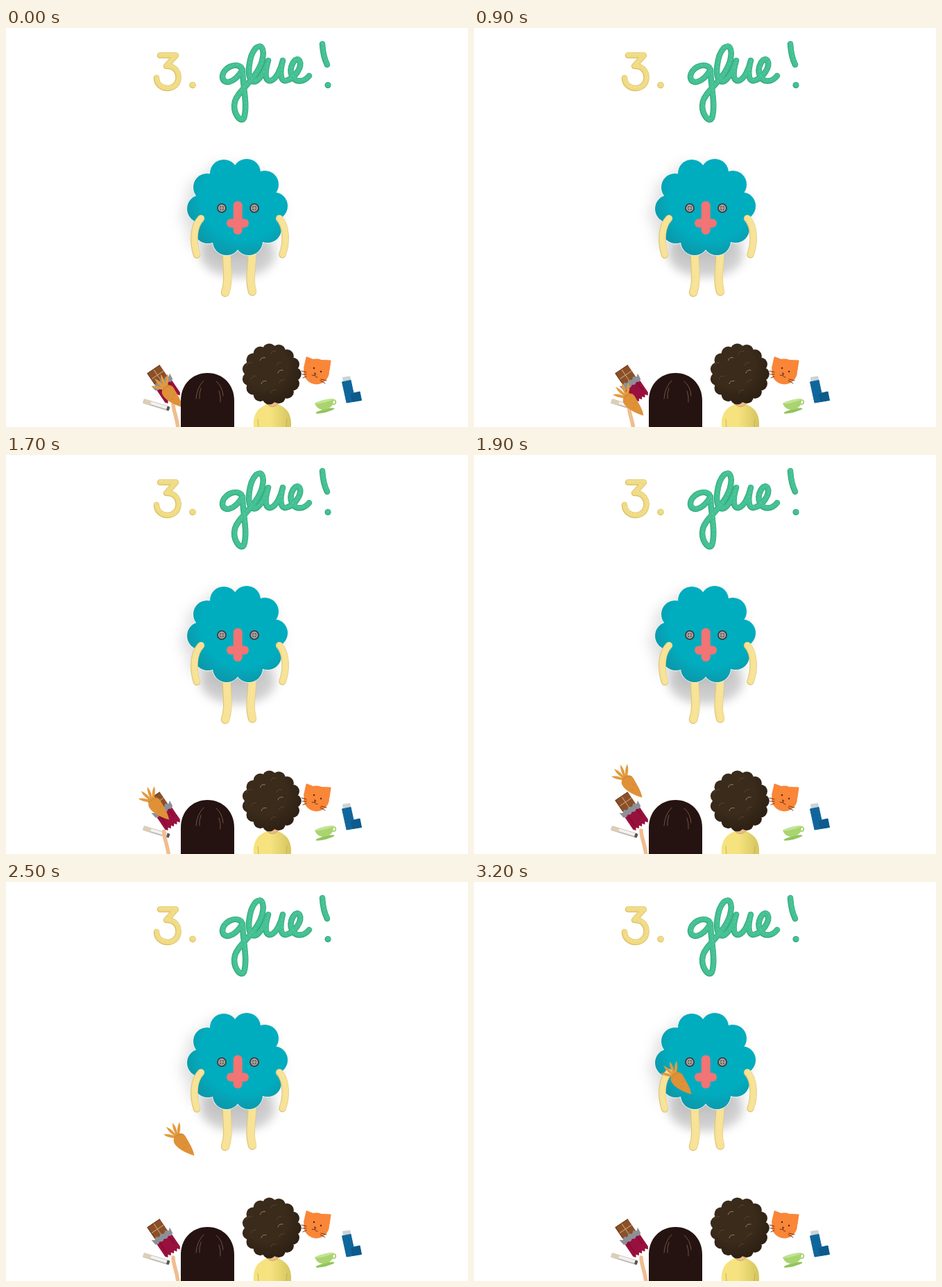
Recreate the animation shown at these times as an HTML page. Size 666 px wide and 576 px high, loop 3300 ms.

```html
<!DOCTYPE html>
<html lang="en">
<head>
<meta charset="utf-8">
<title>3. glue!</title>
<style>
  html, body { margin: 0; width: 100%; height: 100%; overflow: hidden; background: #fff; }
  svg { display: block; width: 100%; height: 100%; }
  .line { fill: none; stroke-linecap: round; stroke-linejoin: round; }
</style>
</head>
<body>
<svg viewBox="0 0 666 576" role="img" aria-label="3. glue!">
  <defs>
    <filter id="soft" x="-40%" y="-40%" width="180%" height="180%"><feGaussianBlur stdDeviation="10"/></filter>
    <filter id="near" x="-40%" y="-60%" width="180%" height="220%"><feGaussianBlur stdDeviation="7"/></filter>
    <radialGradient id="teal" gradientUnits="userSpaceOnUse" cx="342" cy="245" r="86">
      <stop offset=".7" stop-color="#00adbf"/><stop offset="1" stop-color="#0c98aa"/>
    </radialGradient>
    <radialGradient id="brown" gradientUnits="userSpaceOnUse" cx="374" cy="488" r="62">
      <stop offset=".5" stop-color="#3a2b1b"/><stop offset="1" stop-color="#2a1d11"/>
    </radialGradient>
    <linearGradient id="shirt"><stop offset=".45" stop-color="#f6e37f"/><stop offset="1" stop-color="#d5c45e"/></linearGradient>
  </defs>

  <g id="title"></g>

  <g id="shadow" fill="#8d8d8d" opacity=".3" filter="url(#soft)" transform="translate(-8 8)"></g>
  <ellipse cx="334" cy="328" rx="54" ry="32" fill="#9c9c9c" opacity=".48" filter="url(#near)"/>
  <g id="legs"></g>
  <g id="rim" fill="#fff" stroke="#f1f5f3" stroke-width="1.800"></g>
  <g id="body" fill="url(#teal)"></g>
  <g id="eyes"></g>
  <g fill="#f27474">
    <rect x="318" y="275.500" width="32" height="12.500" rx="6.200"/>
    <rect x="327.700" y="280" width="13" height="18" rx="6.300"/>
    <rect x="327.700" y="250" width="13" height="33" rx="6.300"/>
  </g>
  <g id="arms"></g>

  <g transform="translate(216.500 544) rotate(17)">
    <rect x="-19" y="-3" width="38" height="6" rx="1" fill="#f4f2ee" stroke="#bbb" stroke-width=".7"/>
    <rect x="-19" y="1.500" width="38" height="1.600" fill="#bdb8b1"/>
    <rect x="-19" y="-3" width="11" height="6" rx="1" fill="#dccfb5"/>
    <rect x="16" y="-3" width="4" height="6" rx="1" fill="#555"/>
  </g>

  <g id="chocolate" transform="translate(225 511) rotate(-34)">
    <rect x="-11" y="-22.500" width="22" height="26" fill="#8a5029"/>
    <path class="line" d="M0 -21V-3M-10 -12H10" stroke="#c9976a" stroke-width="1.200"/>
    <path class="line" d="M-10.500 -4V-22H10.500" stroke="#6d3a1b" stroke-width="1"/>
  </g>

  <path id="arm" class="line" d="M241 542C241 556 249 562 250 600" stroke="#f0bd90" stroke-width="5.500"/>

  <g id="carrot">
    <g id="leaves" fill="#e39a40"></g>
    <path d="M15 24C16 16 27 13 32 21C37 30 43 39 44.500 48.500C36 46 24 41 18 34C15 30 14 28 15 24Z" fill="#df9138"/>
    <path class="line" d="M16 23Q22 16 29 18M29 38L31 36M33 29L31 31" stroke="#c37d2f" stroke-width=".8"/>
  </g>

  <path d="M252 576V538C252 514 269 498 290.500 498C312 498 329 514 329 538V576Z" fill="#251311"/>
  <path class="line" d="M285 509Q275 519 274 535M281 520Q278 528 279 535M303 510Q312 517 313 531M307 524Q310 532 309 540" stroke="#705246" stroke-width="1"/>

  <path d="M375 538H393V549Q384 556 375 549Z" fill="#edb98d"/>
  <path d="M357 576C356 558 362 549 376 543Q384 551 392 543C406 549 412 558 411 576Z" fill="url(#shirt)"/>
  <path class="line" d="M376 543Q384 551 392 543M364 576L363 565M404 576L405 565" stroke="#bda94f" stroke-width=".8"/>
  <g id="curls"></g>

  <g>
    <path d="M430 491L433.500 475.500L445 480ZM456 480L467.500 480.500L465.500 494Z" fill="#fa8638" stroke="#fa8638" stroke-width="2" stroke-linejoin="round"/>
    <circle cx="447.500" cy="496" r="18.500" fill="#fa8638"/>
    <circle cx="444" cy="491" r="1.200" fill="#4a2416"/><circle cx="454" cy="496" r="1.200" fill="#4a2416"/>
    <path class="line" d="M445 498L447 499L445.500 500.500ZM445.500 501Q443 503 441 501M445.500 501Q446 505 449 504M426 495L433 497M427 500L433 500M428 505L433 503M454 507L462 509M453 509L460 513" stroke="#5a2c18" stroke-width=".9"/>
  </g>

  <g transform="translate(460.500 543) rotate(-14) scale(.92)">
    <ellipse cx="-3" cy="10" rx="15" ry="2.600" fill="#93c45c"/>
    <circle cx="13" cy="0" r="3.500" fill="none" stroke="#a6d06d" stroke-width="2"/>
    <path d="M-16 -5H14C13 4 7 8 -1 8C-10 8 -15 3 -16 -5Z" fill="#a9d470"/>
    <ellipse cx="-1" cy="-5" rx="15" ry="2.200" fill="#c3e394"/>
  </g>

  <path d="M485 504L496 502.500L498 511L486 513Z" fill="#cbd3d6"/>
  <path d="M484.500 511L497 508.500L501 527L510 525L512.500 537.500L491 541Z" fill="#10669b" stroke="#10669b" stroke-linejoin="round"/>
  <path d="M497 529L501 527L510 525L512.500 537.500L499 539.500Z" fill="#0d5a8b"/>
</svg>
<script>
const $ = id => document.getElementById(id);
const add = (id, markup) => $(id).insertAdjacentHTML('beforeend', markup);
const line = (d, color, width, extra = '') =>
  `<path class="line" d="${d}" stroke="${color}" stroke-width="${width}" ${extra}/>`;
const disc = (x, y, r, attrs = '') => `<circle cx="${x}" cy="${y}" r="${r}" ${attrs}/>`;

// A rolled strip of clay: dark edge, main colour, fine lighter grain.
const clay = (d, width, edge, fill, light) =>
  line(d, edge, width) +
  line(d, fill, width - 1.6, 'transform="translate(.3 -.4)"') +
  line(d, light, 1, 'stroke-dasharray="2 4" transform="translate(1 -1.5)" opacity=".6"');

const yellow = ['#d9bd60', '#f0db85', '#f9ebad'];
const green = ['#2da67a', '#44c092', '#70d5ae'];
const limb = ['#dcc477', '#f7e296', '#fbedb9'];

add('title',
  clay('M222 39.500H245L231 55C254 54 254 87 233 87C224 87 217 81 217 72', 8.5, ...yellow) +
  clay('M269 82.500h.1', 9.5, ...yellow) +
  clay('M339 57C330 49 312 58 312 71C313 82 329 81 341 60C341 84 349 111 343 130C338 138 326 122 330 106C335 89 360 76 369 48C374 28 367 23 360 29C350 40 347 69 354 76C362 82 372 66 378 47C372 67 374 78 382 76C390 73 396 60 399 47C394 66 396 78 404 76C416 73 428 56 423 47C417 40 407 57 412 69C417 80 430 78 437 69', 8.5, ...green) +
  clay('M456 23Q457 41 463 53', 8.5, ...green) +
  clay('M464 82.500h.1', 9, ...green));

const lobes = [[314, 210], [347, 209], [373, 226], [386, 257], [377, 290],
               [350, 308], [318, 308], [291, 291], [281, 261], [290, 230]];
const blob = lobes.map(([x, y]) => disc(x, y, 20)).join('') + disc(334, 260, 56);
['shadow', 'rim', 'body'].forEach(id => add(id, blob));

add('legs',
  clay('M318 322C318 350 322 364 316 382', 12.5, ...limb) +
  clay('M355 322C354 350 350 364 355 380.500', 12.5, ...limb));
add('arms',
  clay('M281 275C270 286 269 309 275 327.500', 10.5, ...limb) +
  clay('M394 275C404 286 405 309 398.500 327', 10.5, ...limb));
add('eyes', [311, 358].map(x =>
  disc(x, 260, 7, 'fill="#3c4046"') +
  disc(x, 260, 4.3, 'fill="#6a6463" stroke="#d0c6c1" stroke-width="1.2"') +
  line(`M${x - 3} 260h6M${x} 257v6`, '#d0c6c1', 0.9)).join(''));

// Foil and wrapper with toothed edges.
const teeth = (x, y, n, dx, dy) =>
  Array.from({ length: n }, (_, i) => `L${x + dx * (i + 1)} ${y + (i % 2 ? 0 : dy)}`).join('');
add('chocolate',
  `<path d="M-13 0H13V27${teeth(13, 27, 10, -2.6, 3.5)}Z" fill="#98103d"/>` +
  line('M-8 8V23M8 7V19', '#7b0b30', 1) +
  `<path d="M-16 -4${teeth(-16, -4, 8, 4, 3)}L15 5${teeth(15, 5, 8, -3.75, 2)}Z" fill="#8d9097"/>`);

// Carrot leaves: pointed blades fanning out from one base.
const leaf = ([x, y]) => {
  const dx = x - 21, dy = y - 23, k = 4.2 / Math.hypot(dx, dy);
  const mx = 21 + dx * .6, my = 23 + dy * .6;
  return `<path d="M21 23Q${mx - dy * k} ${my + dx * k} ${x} ${y}Q${mx + dy * k} ${my - dx * k} 21 23Z"/>`;
};
add('leaves', [[0, 18], [4, 7], [13, 1], [23, 0]].map(leaf).join('') + disc(20, 20, 5));

// Curly hair: a ring of lumps and a few curved glints.
const ring = (n, fn) => Array.from({ length: n }, (_, i) => fn(i * 2 * Math.PI / n, i)).join('');
add('curls',
  disc(383, 499.5, 36, 'fill="url(#brown)"') +
  ring(15, a => disc(383 + 33 * Math.cos(a), 499.5 + 34.5 * Math.sin(a), 9.8, 'fill="url(#brown)"')) +
  ring(9, (a, i) => {
    const r = 15 + i * 7 % 18, x = 381 + r * Math.cos(a), y = 496 + r * Math.sin(a);
    return line(`M${x - 4} ${y + 2}q1 -5 7 -4`, i % 3 ? '#5b4835' : '#a08d72', 0.9);
  }));

// [step, carrot x, carrot y, arm shift x, arm shift y]
const poses = [
  [0, 210, 499, 0, 0],
  [6, 202.5, 509, -14, 5],
  [12, 197.5, 513, -21, 5],
  [14, 197, 513, -22, 5],
  [16, 187, 494, -20, 2],
  [19, 198, 446, 0, 0],
  [25, 227, 346.5, 0, 0],
  [31, 253.5, 275.5, 0, 0],
  [32, 269, 258, 0, 0]
];

function poseAt(step) {
  const next = Math.max(1, poses.findIndex(p => p[0] >= step));
  const a = poses[next - 1], b = poses[next];
  const k = (step - a[0]) / (b[0] - a[0]);
  return a.map((v, i) => v + (b[i] - v) * k);
}

const start = performance.now();
function draw() {
  const time = Math.max(0, performance.now() - start) % 3300;
  const [, x, y, armX, armY] = poseAt(Math.floor(time / 100));
  $('carrot').setAttribute('transform', `translate(${x} ${y})`);
  $('arm').setAttribute('transform', `translate(${armX} ${armY})`);
  requestAnimationFrame(draw);
}
draw();
</script>
</body>
</html>
```
